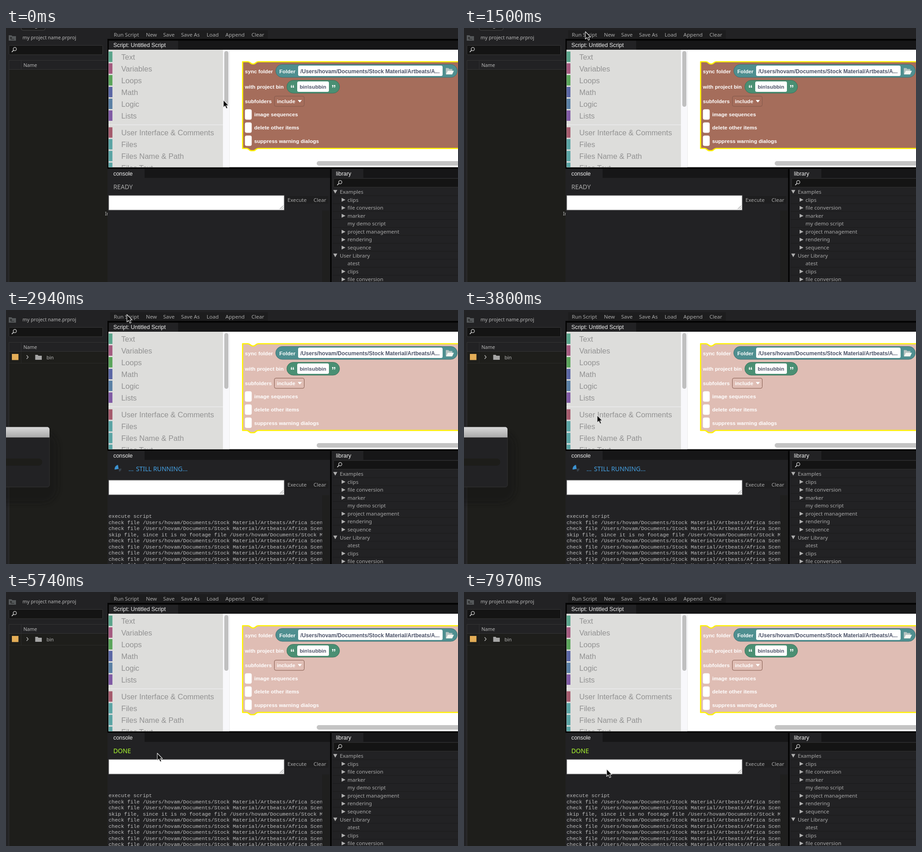
Animation of 998x561 px, one loop 8 s. Source, as an HTML page:

```html
<!DOCTYPE html>
<html lang="en">
<head>
<meta charset="utf-8">
<title>Script panel</title>
<style>
html, body { margin: 0; width: 100%; height: 100%; overflow: hidden; background: #222224; }
svg { display: block; width: 998px; height: 561px; }
text { white-space: pre; }
.ui { font: 11.6px "Noto Sans", "Open Sans", sans-serif; fill: #a9a9a9; }
.panel { font: 10.7px "Noto Sans", "Open Sans", sans-serif; fill: #b8b8b8; }
.status { font: 13.8px "Noto Sans", "Open Sans", sans-serif; }
.tab { font: 12.4px "Liberation Sans", Arial, sans-serif; fill: #f2f2f2; }
.cat { font: 16.6px "Liberation Sans", Arial, sans-serif; fill: #929292; }
.block { font: bold 11.6px "Liberation Sans", Arial, sans-serif; fill: #fff; }
.field { font: bold 11.6px "Liberation Sans", Arial, sans-serif; fill: #4b5268; }
.path { font-size: 12.05px; }
.quote { font-size: 20px; }
.log { font: 11.43px "Liberation Mono", "Courier New", monospace; fill: #bebebe; }
</style>
</head>
<body>
<svg id="stage" viewBox="0 0 998 561">
  <defs>
    <linearGradient id="title" x2="0" y2="1"><stop stop-color="#d8d8d8"/><stop offset="1" stop-color="#a9a9a9"/></linearGradient>
    <filter id="soft" x="-50%" y="-50%" width="200%" height="200%"><feGaussianBlur stdDeviation="6"/></filter>
    <clipPath id="logClip"><rect x="226" y="404" width="472" height="157"/></clipPath>
    <clipPath id="leftClip"><rect width="224.5" height="561"/></clipPath>
    <clipPath id="boxClip"><rect x="226.5" y="48" width="252.5" height="259.5"/></clipPath>
  </defs>
</svg>
<script>
const LOOP = 8000, RUN = 2900, BAR = 4600, DONE = 5320;
const stage = document.getElementById('stage');

function add(parent, tag, attrs = {}, content) {
  const el = document.createElementNS('http://www.w3.org/2000/svg', tag);
  for (const k in attrs) el.setAttribute(k, attrs[k]);
  if (content) el.textContent = content;
  parent.append(el);
  return el;
}
const group = (parent, attrs) => add(parent, 'g', attrs);
const rect = (p, x, y, width, height, fill, more) => add(p, 'rect', { x, y, width, height, fill, ...more });
const path = (p, d, fill, more) => add(p, 'path', { d, fill, ...more });
const label = (p, x, y, cls, str, more) => add(p, 'text', { x, y, class: cls, ...more }, str);

const play = (el, frames) => el.animate(frames, { duration: LOOP, iterations: Infinity });
// rows: [time, value], held until the next row
function hold(el, prop, rows) {
  const frames = rows.map(([t, v]) => ({ offset: t / LOOP, [prop]: v, easing: 'steps(1, end)' }));
  play(el, [...frames, { offset: 1, [prop]: rows.at(-1)[1] }]);
}
function show(el, from, to = LOOP) {
  const rows = from ? [[0, 0], [from, 1]] : [[0, 1]];
  if (to < LOOP) rows.push([to, 0]);
  hold(el, 'opacity', rows);
}
function magnifier(x, y) {
  add(stage, 'circle', { cx: x, cy: y, r: 3.6, fill: 'none', stroke: '#d0d0d0', 'stroke-width': 1.3 });
  path(stage, `M${x - 2.7} ${y + 2.7}l-4 4`, 'none', { stroke: '#d0d0d0', 'stroke-width': 1.7 });
}

function projectPanel() {
  const g = group(stage, { 'clip-path': 'url(#leftClip)' });
  rect(g, 0, 0, 225, 561, '#222224');
  const button = group(g);
  rect(button, 33.5, -12, 53, 17, '#1c1c1c', { rx: 4, stroke: '#4a4a4a' });
  path(button, 'M64 0q2 2 5 0', 'none', { stroke: '#aaa' });
  show(button, 0, 2440);
  path(g, 'M6 16h6l2 2h8v10h-16z', '#55585a');
  path(g, 'M11 25h7M11 25v-4M9 22.5l2-2 2 2', 'none', { stroke: '#222', 'stroke-width': 1.2 });
  label(g, 36.5, 25, 'panel', 'my project name.prproj');
  rect(g, 6.5, 38.5, 207, 20.5, '#141414', { rx: 2, stroke: '#383838' });
  rect(g, 7, 71, 218, 490, '#1e1e1b');
  rect(g, 7, 71, 218, 20, '#222224');
  path(g, 'M6.5 561V71.5H225M7 91.5H225', 'none', { stroke: '#343435' });
  path(g, 'M33.5 72V91', 'none', { stroke: '#303031' });
  label(g, 38.5, 86, 'panel', 'Name');

  show(label(g, 218.5, 414, 'panel', 'In'), 0, 2440);

  const row = group(g);
  path(row, 'M7 117.5H225M33.5 92V117', 'none', { stroke: '#2a2a29' });
  rect(row, 13, 97, 14.5, 13.5, '#e3ad57');
  path(row, 'M45.5 100l3.5 4-3.5 4', 'none', { stroke: '#b4b4b4', 'stroke-width': 1.4 });
  path(row, 'M64.5 99h5.5l1.5 2h7.5v9h-14.5z', '#a5a5a5');
  label(row, 89.5, 109, 'panel', 'bin');
  show(row, 2340);
  magnifier(19.5, 46.5);
}

function scriptPanel() {
  rect(stage, 224, 0, 774, 24, '#222224');
  rect(stage, 230, 5, 348, 19, '#1d1d1e');
  const menu = { 'Run Script': 238, New: 309, Save: 347, 'Save As': 386.5, Load: 443, Append: 484.5, Clear: 542 };
  for (const name in menu) label(stage, menu[name], 19, 'ui', name);
  rect(stage, 224, 24, 774, 287, '#040404');
  rect(stage, 227, 28, 771, 20, '#161617');
  rect(stage, 227, 28, 153, 20, '#222224');
  label(stage, 237, 41.5, 'tab', 'Script: Untitled Script');

  rect(stage, 226.5, 48, 772, 259.5, '#fff');
  rect(stage, 479, 48, 14, 259.5, '#f8f8fb');
  path(stage, 'M493.5 48V307', 'none', { stroke: '#ececec' });
  rect(stage, 482, 51, 9, 123, '#c0c0c0', { rx: 4.5 });
  const box = group(stage, { 'clip-path': 'url(#boxClip)' });
  rect(box, 226, 48, 253, 260, '#dddddb');
  rect(box, 226, 213, 253, 1.5, '#ebebeb');
  const cats = [['Text', '#5ba58c'], ['Variables', '#a55b80'], ['Loops', '#5ba55b'], ['Math', '#5b67a5'],
    ['Logic', '#5b80a5'], ['Lists', '#805ba5'], ['User Interface & Comments', '#a55b6d'],
    ['Files', '#5ba5a5'], ['Files Name & Path', '#5ba5a5'], ['Files Text', '#5ba5a5']];
  cats.forEach(([name, color], i) => {
    const y = 64 + 26 * i + (i > 5 ? 11.3 : 0);
    rect(box, 226, y - 12, 9, 23, color);
    label(box, 254.5, y + 6, 'cat', name);
  });
  rect(stage, 686, 294, 330, 10, '#c4c4c4', { rx: 5 });
}

function syncBlock() {
  const body = path(stage, 'M522.4 74.5H534c3 0 4 1 5.5 2.5s2.5 2.5 5 2.5h2c2.5 0 3.5-1 5-2.5s2.5-2.5 5.5-2.5H1010V266H557c-3 0-4 1-5.5 2.5s-2.5 2.5-5 2.5h-5c-2.5 0-3.5-1-5-2.5s-2.5-2.5-5.5-2.5H522.4z',
    '#a56d5b', { stroke: '#fff200', 'stroke-width': 2.6, 'stroke-linejoin': 'round' });
  hold(body, 'fill', [[0, '#a56d5b'], [RUN, '#dfbdb4']]);

  const say = (x, y, str) => label(stage, x, y, 'block', str);
  say(527.5, 99.5, 'sync folder');
  rect(stage, 595.5, 80.5, 401, 28.5, '#4f8f90', { rx: 14.2, stroke: '#3d6f70' });
  say(603.5, 99.5, 'Folder');
  rect(stage, 645, 83, 319, 23, '#fff', { rx: 3.5 });
  label(stage, 650, 99.5, 'field path', '/Users/hovam/Documents/Stock Material/Artbeats/A...');
  path(stage, 'M971 102V88.5h6l1.5 2h7V102z', '#b5c4c2');
  path(stage, 'M971.5 102.5l4-8h13.5l-4 8z', '#f6f6f2');

  say(527.5, 134, 'with project bin');
  rect(stage, 620, 115.5, 116.5, 28.5, '#4a8f73', { rx: 14.2, stroke: '#3a705a' });
  label(stage, 627.5, 140, 'block quote', '\u201c');
  label(stage, 718.5, 140, 'block quote', '\u201d');
  rect(stage, 643, 118, 70, 23, '#fff', { rx: 3.5 });
  label(stage, 648.5, 134, 'field', 'bin\\subbin');

  say(527.5, 166, 'subfolders');
  rect(stage, 592.5, 150.5, 66, 22.5, 'none', { rx: 3.5, stroke: '#82584b' });
  say(598, 166, 'include');
  path(stage, 'M645 159.5h7.5l-3.75 4.5z', '#fff', { stroke: '#fff', 'stroke-linejoin': 'round' });
  ['image sequences', 'delete other items', 'suppress warning dialogs'].forEach((str, i) => {
    rect(stage, 527.5, 179.5 + 29 * i, 15, 23, '#fff', { rx: 4 });
    say(548, 195.3 + 29.1 * i, str);
  });
}

function consolePanel() {
  rect(stage, 224.5, 311, 491.5, 250, '#222224');
  rect(stage, 226, 311, 490, 20, '#161617');
  rect(stage, 226, 311, 80, 20, '#222224');
  label(stage, 237, 325.5, 'tab', 'console');
  show(label(stage, 237, 355.5, 'status', 'READY', { fill: '#a9a9a9' }), 0, RUN);
  show(label(stage, 237, 355.5, 'status', 'DONE', { fill: '#adff2f' }), DONE);

  const busy = group(stage, { fill: '#45a3e6' });
  label(busy, 270.5, 355.5, 'status', '...');
  label(busy, 287, 355.5, 'status', 'STILL RUNNING...');
  const wheel = group(group(busy, { transform: 'translate(248.7 351)' }));
  path(wheel, 'M0 0V-9A9 9 0 0 1 9 0z', '#3d94d3');
  path(wheel, 'M0 0V6A6 6 0 0 1 -6 0z', '#39434c');
  play(wheel, { transform: ['rotate(109deg)', 'rotate(3458deg)'] });
  show(busy, RUN, DONE);

  const low = group(stage);
  rect(low, 698, 403, 16, 170, '#1f1f1e');
  rect(low, 227, 370, 387, 32, '#fff', { stroke: '#8d8d8d' });
  path(low, 'M604.5 400l7.5-7.5M608.5 400l3.5-3.5', 'none', { stroke: '#666' });
  rect(low, 618, 371, 94, 17, '#1e1e1f');
  label(low, 621.5, 383.5, 'ui', 'Execute');
  label(low, 679, 383.5, 'ui', 'Clear');
  hold(low, 'transform', [[0, 'translateY(0)'], [RUN, 'translateY(6px)'], [DONE, 'translateY(0)']]);

  const log = group(group(stage, { 'clip-path': 'url(#logClip)' }));
  const file = '/Users/hovam/Documents/Stock Material/Artbeats/Africa Scenes';
  for (let i = 0; i < 10; i++) {
    const str = i === 0 ? 'execute script'
      : i === 3 ? 'skip file, since it is no footage file ' + file : 'check file ' + file;
    label(log, 226.5, 453.2 + 13.5 * i, 'log', str);
  }
  show(log, RUN);
  hold(log, 'transform', [[0, 'translateY(6px)'], [DONE, 'translateY(0)']]);
}

function libraryPanel() {
  rect(stage, 715.5, 311, 4, 250, '#040404');
  rect(stage, 719, 311, 279, 250, '#222224');
  rect(stage, 719, 311, 279, 20, '#161617');
  rect(stage, 719, 311, 70, 20, '#222224');
  label(stage, 728.5, 325.5, 'tab', 'library');
  rect(stage, 723.5, 332.5, 290, 19, '#141414', { stroke: '#303030' });
  magnifier(738, 340.5);
  // "-" open folder, "+" closed folder, "." script
  const rows = ['-Examples', '+clips', '+file conversion', '+marker', '.my demo script', '+project management',
    '+rendering', '+sequence', '-User Library', '.atest', '+clips', '+file conversion'];
  rows.forEach((row, i) => {
    const y = 361.8 + 17.57 * i, kind = row[0];
    rect(stage, 721, y + 8, 277, 1, '#1b1b1c');
    if (kind === '-') path(stage, `M722.5 ${y - 4}h9l-4.5 8z`, '#b0b0b0');
    if (kind === '+') path(stage, `M741 ${y - 4}v8.5l8.5-4.25z`, '#b0b0b0');
    label(stage, kind === '-' ? 737 : 754, y + 4.2, 'ui', row.slice(1));
  });
}

function progressDialog() {
  const g = group(stage);
  rect(g, -60, 268, 174, 158, '#121213', { rx: 34, opacity: 0.45, filter: 'url(#soft)' });
  path(g, 'M-2 258.5H91a5 5 0 0 1 5 5V386a5 5 0 0 1 -5 5H-2z', '#222224', { stroke: '#343435' });
  path(g, 'M-2 258.5H91a5 5 0 0 1 5 5V281.5H-2z', 'url(#title)');
  rect(g, -40, 328, 120, 16, '#1d1d1a', { rx: 8 });
  show(rect(g, -40, 328, 120, 16, '#438de6', { rx: 8 }), BAR);
  show(g, 2600, DONE);
}

function pointer() {
  const el = path(stage, 'M0 0V16.5L3.7 13L6.5 19L9.3 17.8L6.6 12H11.5z', '#0a0a0a',
    { stroke: '#e8e8e8', 'stroke-width': 1.1, 'stroke-linejoin': 'round' });
  const soft = 'ease-in-out', out = 'ease-out', inn = 'ease-in';
  const way = [[0, 480, 159], [500, 480, 159, soft], [1300, 295, 22], [1340, 295, 22, out], [1500, 268, 8],
    [2070, 268, 8], [2100, 267, 10], [3430, 267, 10, inn], [3800, 294, 232, out], [4270, 299, 340, soft],
    [4460, 322, 366, soft], [4700, 364, 350, soft], [4900, 348, 332, soft], [5170, 345, 334, soft],
    [5740, 334, 356, soft], [5970, 329, 334, soft], [6800, 290, 420], [6840, 291, 422, soft],
    [7400, 354, 483], [7670, 354, 483, soft], [7970, 315, 391], [LOOP, 315, 391]];
  play(el, way.map(([t, x, y, easing = 'linear']) =>
    ({ offset: t / LOOP, transform: `translate(${x}px, ${y}px)`, easing })));
}

projectPanel();
scriptPanel();
syncBlock();
consolePanel();
libraryPanel();
progressDialog();
pointer();
</script>
</body>
</html>
```
